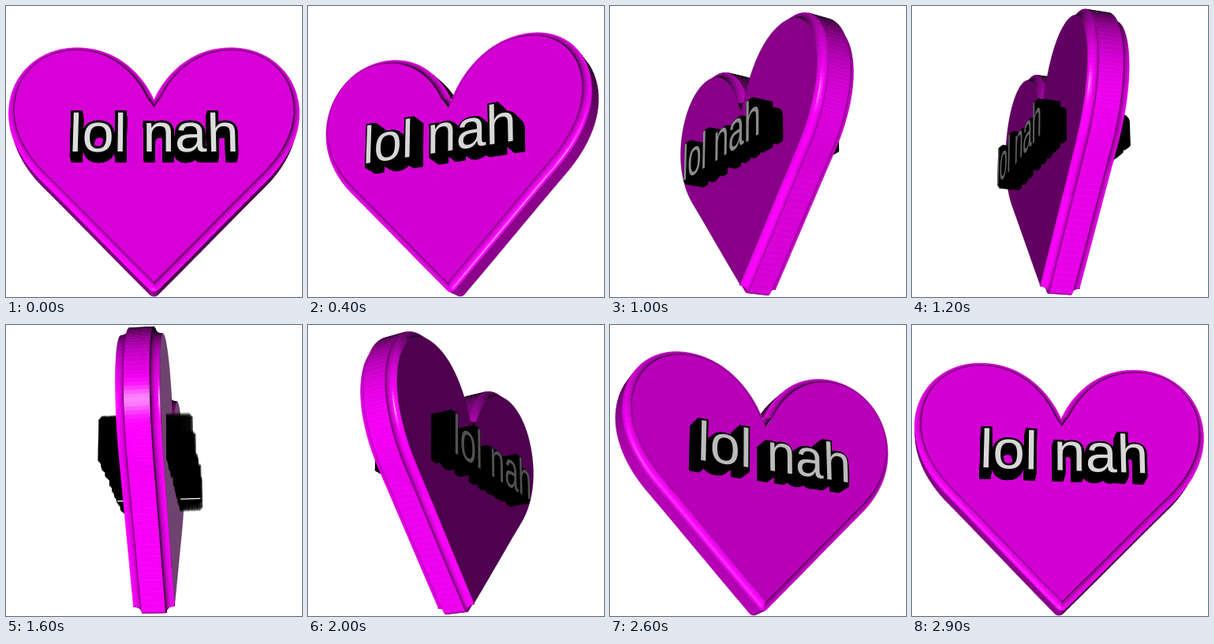
An HTML page with a canvas that plays this animation: 375x368 px, repeating every 3 s.

```html
<!DOCTYPE html>
<html lang="en">
<head>
<meta charset="utf-8">
<title>Spinning heart</title>
<style>
html, body { margin: 0; width: 100%; height: 100%; overflow: hidden; background: #fff; }
canvas { display: block; width: 375px; height: 368px; }
</style>
</head>
<body>
<canvas id="stage" width="375" height="368"></canvas>
<script>
const ctx = document.getElementById('stage').getContext('2d');
const CX = 187.5, CY = 184, DIST = 1240;
const TILT_SIN = 0.34, TILT_COS = 0.94;
const LIGHT = [-0.13, -0.14, 0.96], SHINE = [-0.04, 0.04, 0.998];
const BODY_Z = 14.5, FACE_Z = 25, INSET = 8.5;
const TEXT_Z = 56, BASELINE = -20, SIZE = 69.8;
const FONT = SIZE + 'px "Liberation Sans", Arial, sans-serif';
const LABEL = 'lol nah';

// Half outline from notch to tip, as cubic curves
const CURVES = [
  [0, 64, 12, 95, 45, 138, 100, 138],
  [100, 138, 150, 138, 184.5, 100, 184.5, 51],
  [184.5, 51, 184.5, 15, 165, -18, 140, -43],
  [140, -43, 96, -87, 52, -133, 7, -178],
  [7, -178, 4, -181, 3, -182, 0, -182]
];

function bezier(c, t) {
  const u = 1 - t;
  const at = k => u * u * u * c[k] + 3 * u * u * t * c[k + 2] + 3 * u * t * t * c[k + 4] + t * t * t * c[k + 6];
  const slope = k => u * u * (c[k + 2] - c[k]) + 2 * u * t * (c[k + 4] - c[k + 2]) + t * t * (c[k + 6] - c[k + 4]);
  const dx = slope(0), dy = slope(1), len = Math.hypot(dx, dy);
  return { x: at(0), y: at(1), nx: -dy / len, ny: dx / len };
}

function buildOutline() {
  const half = [{ x: 0, y: 64, nx: 0, ny: 1.6 }];
  CURVES.forEach((c, i) => {
    const n = i === 4 ? 5 : 24;
    for (let k = 1; k <= n; k++) half.push(bezier(c, k / n));
  });
  const right = half.map(p => ({ ...p, side: 1 }));
  const left = half.slice(1, -1).reverse().map(p => ({ x: -p.x, y: p.y, nx: -p.nx, ny: p.ny, side: -1 }));
  return right.concat(left);
}

// Edge cross-section with a hollow cove on each side: [inset, z]
function buildProfile() {
  const front = [];
  for (let k = 0; k <= 7; k++) {
    const a = k / 7 * Math.PI / 2;
    front.push([INSET * Math.sin(a), BODY_Z + (FACE_Z - BODY_Z) * (1 - Math.cos(a))]);
  }
  return front.map(([i, z]) => [i, -z]).reverse().concat(front);
}

const outline = buildOutline();
const profile = buildProfile();

function inset(p, d) {
  const x = p.x - p.nx * d;
  return [x * p.side < 0 ? 0 : x, p.y - p.ny * d];
}

// Object space to view space
function turn([x, y, z], a) {
  const s = Math.sin(a), c = Math.cos(a);
  const depth = x * s + z * c;
  return [x * c - z * s, y * TILT_COS + depth * TILT_SIN, depth * TILT_COS - y * TILT_SIN];
}

function project([x, y, z]) {
  const k = DIST / (DIST - z);
  return [CX + x * k, CY - y * k];
}

const place = (p, a) => project(turn(p, a));
const dot = (a, b) => a[0] * b[0] + a[1] * b[1] + a[2] * b[2];
const facing = (n, v) => n[0] * -v[0] + n[1] * -v[1] + n[2] * (DIST - v[2]) > 0;

function trace(pts) {
  ctx.beginPath();
  pts.forEach(p => ctx.lineTo(p[0], p[1]));
  ctx.closePath();
}

function edgeColor(n) {
  const lit = Math.max(0, dot(n, LIGHT));
  const shine = 190 * Math.pow(Math.min(1, Math.max(0, dot(n, SHINE))), 140);
  const m = Math.min(255, 22 + 240 * lit + shine);
  return `rgb(${m},${shine},${m})`;
}

function drawEdge(a) {
  const rings = profile.map(([d, z]) => outline.map(p => turn([...inset(p, d), z], a)));
  const quads = [];
  for (let j = 0; j + 1 < profile.length; j++) {
    const di = profile[j + 1][0] - profile[j][0], dz = profile[j + 1][1] - profile[j][1];
    const len = Math.hypot(di, dz);
    outline.forEach((p, i) => {
      const k = (i + 1) % outline.length, q = outline[k];
      let nx = p.nx + q.nx, ny = p.ny + q.ny;
      const l = Math.hypot(nx, ny) || 1;
      nx /= l; ny /= l;
      const n = turn([nx * dz / len, ny * dz / len, di / len], a);
      const v = [rings[j][i], rings[j][k], rings[j + 1][k], rings[j + 1][i]];
      if (!facing(n, v[0])) return;
      quads.push({ v, n, z: v[0][2] + v[1][2] + v[2][2] + v[3][2] });
    });
  }
  quads.sort((p, q) => p.z - q.z);
  ctx.lineWidth = 0.6;
  for (const q of quads) {
    ctx.fillStyle = ctx.strokeStyle = edgeColor(q.n);
    trace(q.v.map(project));
    ctx.fill();
    ctx.stroke();
  }
}

function drawFace(a, n) {
  const lit = dot(n, LIGHT);
  const haze = Math.max(0, 0.25 - n[2]) * 4;
  const m = Math.max(20, 252 * lit) + 150 * haze;
  ctx.fillStyle = `rgb(${m},${110 * haze},${m})`;
  trace(outline.map(p => place([...inset(p, INSET), FACE_Z], a)));
  ctx.fill();
  ctx.strokeStyle = 'rgba(50,0,50,.4)';
  ctx.lineWidth = 0.8;
  ctx.stroke();
}

// One layer of the label, each letter placed with its own local transform
function drawLayer(a, z, grow) {
  ctx.font = FONT;
  let x = -ctx.measureText(LABEL).width / 2;
  for (const ch of LABEL) {
    const w = ctx.measureText(ch).width, mx = x + w / 2, my = BASELINE + 25;
    const o = place([mx, my, z], a);
    const h = place([mx + 10, my, z], a), v = place([mx, my - 10, z], a);
    ctx.setTransform((h[0] - o[0]) / 10, (h[1] - o[1]) / 10, (v[0] - o[0]) / 10, (v[1] - o[1]) / 10, o[0], o[1]);
    ctx.fillText(ch, -w / 2, 25);
    if (grow) {
      ctx.lineWidth = grow;
      ctx.strokeText(ch, -w / 2, 25);
    }
    x += w;
  }
  ctx.setTransform(1, 0, 0, 1, 0, 0);
}

// The black block runs out from the front (side 1) or the back (side -1)
function drawBlock(a, side) {
  ctx.fillStyle = ctx.strokeStyle = '#000';
  ctx.lineJoin = 'miter';
  ctx.miterLimit = 3;
  for (let z = FACE_Z; z < TEXT_Z; z += 0.6) {
    drawLayer(a, side * z, Math.min(7.5, 1 + (TEXT_Z - z) * 1.6));
  }
}

function drawLetters(a, n) {
  if (n[2] < 0.2) return;
  const g = 258 * dot(n, LIGHT);
  ctx.fillStyle = `rgb(${g},${g},${g})`;
  drawLayer(a, TEXT_Z, 0);
}

// Light caught under the far letters when seen almost edge-on
function drawGlint(a, n, side) {
  if (Math.abs(n[2]) > 0.12) return;
  const x = -58 / Math.sin(a);
  ctx.strokeStyle = '#fff';
  ctx.lineWidth = 1.3;
  ctx.beginPath();
  ctx.moveTo(...place([x, BASELINE, side * 29], a));
  ctx.lineTo(...place([x, BASELINE, side * 55], a));
  ctx.stroke();
}

function draw(step) {
  let deg = step * 6;
  if (deg > 90) deg -= 180;
  const a = deg * Math.PI / 180;
  const n = turn([0, 0, 1], a);
  const open = facing(n, turn([0, 0, FACE_Z], a));
  const front = () => {
    drawBlock(a, 1);
    drawLetters(a, n);
    drawGlint(a, n, 1);
  };

  ctx.fillStyle = '#fff';
  ctx.fillRect(0, 0, 375, 368);
  drawBlock(a, -1);
  drawGlint(a, n, -1);
  if (!open) front();
  drawEdge(a);
  if (open) {
    drawFace(a, n);
    front();
  }
}

let shown = -1;
function tick() {
  const step = Math.floor(performance.now() % 3000 / 100);
  if (step !== shown) draw(shown = step);
  requestAnimationFrame(tick);
}
tick();
</script>
</body>
</html>
```
